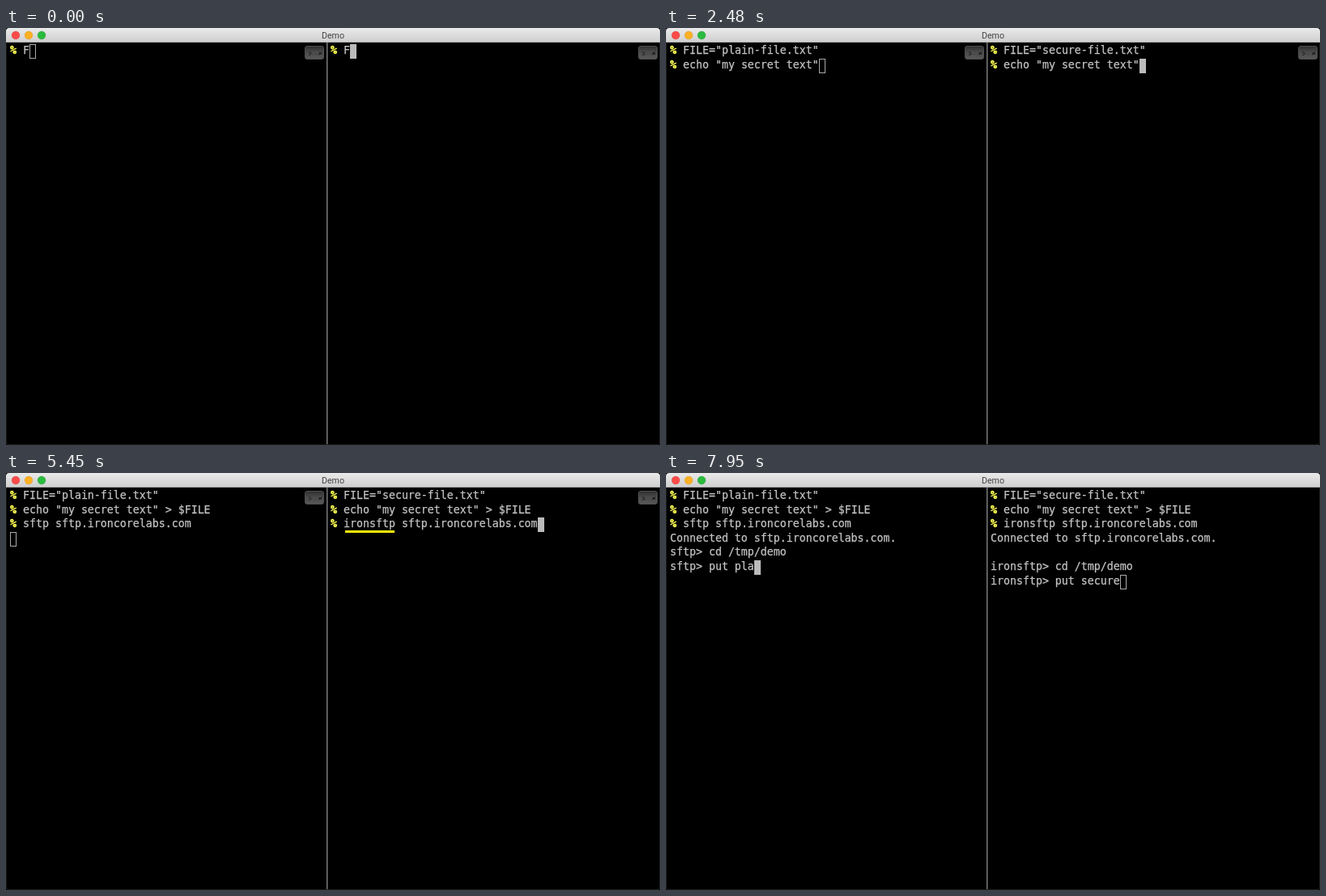
Write an HTML page that moves like this. It is 808 px wide and 516 px high and loops after 8000 ms.

```html
<!DOCTYPE html>
<html lang="en">
<head>
<meta charset="utf-8">
<title>Demo</title>
<style>
  html, body { margin: 0; width: 100%; height: 100%; overflow: hidden; background: #000; }
  svg { display: block; width: 808px; height: 516px; }
  text { white-space: pre; }
  .term { font: 13.288px "DejaVu Sans Mono", monospace; fill: #c4c4c4; stroke: #c4c4c4; stroke-width: .25; }
  .prompt { font-weight: bold; fill: #ffff55; stroke: #ffff55; stroke-width: .5; }
  .title { font: 10.7px Roboto, sans-serif; fill: #444; text-anchor: middle; }
</style>
</head>
<body>
<svg id="stage" viewBox="0 0 808 516">
  <defs>
    <linearGradient id="bar" x2="0" y2="1">
      <stop offset="0" stop-color="#eaeaea"/>
      <stop offset="1" stop-color="#cecece"/>
    </linearGradient>
    <linearGradient id="metal" x2="0" y2="1">
      <stop offset="0" stop-color="#2e2e2e"/>
      <stop offset=".45" stop-color="#4a4a4a"/>
      <stop offset="1" stop-color="#585858"/>
    </linearGradient>
    <g id="icon">
      <rect x=".5" y=".5" width="23" height="16" rx="2.5" fill="url(#metal)" stroke="#4e4e4e"/>
      <path d="M5 8H6.2A1.6 1.6 0 0 1 6.2 11.2H5" fill="none" stroke="#181818"/>
      <path d="M9 10.5H16" stroke="#404040" stroke-dasharray="1 1"/>
      <path d="M17.5 11.5L21 7.5M18 8L21 11M17.5 9.5H21" stroke="#181818"/>
    </g>
  </defs>
  <rect width="808" height="516"/>
  <path d="M0 18V4Q0 0 4 0H804Q808 0 808 4V18Z" fill="url(#bar)"/>
  <path d="M0 17.5H808" stroke="#a9a9a9"/>
  <circle cx="12" cy="9" r="4.8" fill="#fc4b48" stroke="#dc3b38" stroke-width=".6"/>
  <circle cx="28" cy="9" r="4.8" fill="#fdb023" stroke="#dc981c" stroke-width=".6"/>
  <circle cx="44" cy="9" r="4.8" fill="#29bb3d" stroke="#1c9e2e" stroke-width=".6"/>
  <text class="title" x="404" y="13">Demo</text>
  <path d="M.25 18V512Q.25 515.7 4 515.7H804Q807.7 515.7 807.7 512V18" fill="none" stroke="#454545" stroke-width=".5"/>
  <path d="M396.75 18V515" stroke="#8c8c8c" stroke-width="1.3"/>
  <g id="icons"><use href="#icon" x="369" y="22"/><use href="#icon" x="781" y="22"/></g>
  <rect id="mark" x="419" y="71" width="61" height="3" fill="#fbee0a"/>
</svg>
<script>
const LOOP = 8000, CELL = 8, PITCH = 17.6, ROWS = 7;
const LEFT = [0], RIGHT = [1], BOTH = [0, 1];
const stage = document.getElementById('stage');
const icons = document.getElementById('icons');
const mark = document.getElementById('mark');

function add(tag, attrs) {
  const el = document.createElementNS('http://www.w3.org/2000/svg', tag);
  set(el, attrs);
  return stage.appendChild(el);
}
function set(el, attrs) {
  for (const k in attrs) el.setAttribute(k, attrs[k]);
}
const rowTop = n => Math.round(20 + PITCH * n);

// Output events: when, which panes, what is appended
const events = [];
function print(time, panes, text) {
  events.push({ time, panes, text });
}
function type(from, to, panes, text, steps = text.length) {
  const cut = i => Math.round(i * text.length / steps);
  for (let i = 0; i < steps; i++) {
    const time = steps > 1 ? from + (to - from) * i / (steps - 1) : from;
    print(time, panes, text.slice(cut(i), cut(i + 1)));
  }
}

print(0, BOTH, '% F');
type(60, 90, BOTH, 'ILE', 2);
print(420, BOTH, '=');
print(600, BOTH, '"');
type(630, 660, RIGHT, 'secure', 2);
type(690, 750, LEFT, 'plain', 2);
type(930, 1170, BOTH, '-file.txt', 7);
print(1320, BOTH, '"\n% ');
type(1520, 1880, BOTH, 'echo "my');
type(1910, 2300, BOTH, ' secret ', 6);
print(2300, LEFT, 't');
print(2330, RIGHT, 't');
type(2330, 2750, BOTH, 'ext" > $FIL', 9);
print(3480, BOTH, 'E\n% ');
type(4190, 4250, RIGHT, 'ironsftp', 3);
type(4280, 4310, LEFT, 'sftp', 2);
type(4340, 4400, BOTH, ' sft', 3);
type(4460, 4970, BOTH, 'p.ironcorel');
type(5000, 5240, BOTH, 'abs.com');
print(5450, LEFT, '\n');
print(5580, LEFT, 'Connected to sftp.ironcorelabs.com.\nsftp> ');
print(5580, RIGHT, '\nConnected to sftp.ironcorelabs.com.\n\nironsftp> ');
type(5820, 6300, BOTH, 'cd /tmp/demo');
print(7050, LEFT, '\nsftp> ');
print(7050, RIGHT, '\nironsftp> ');
type(7380, 7522, BOTH, 'put ');
type(7570, 7807, RIGHT, 'secure');
type(7855, 7950, LEFT, 'pla');
events.sort((a, b) => a.time - b.time);

// The icons show only while both panes share the input
const leftFocus = [[690, 780], [4280, 4340], [7830, LOOP]];
const iconsOff = [[630, 780], [4190, 4340], [7570, LOOP]];
const marked = [[4310, 5580]];
const within = (spans, t) => spans.some(([a, b]) => t >= a && t < b);
const show = (el, on) => set(el, { visibility: on ? 'visible' : 'hidden' });

const panes = [5, 401].map(x => ({
  x,
  rows: Array.from({ length: ROWS }, (_, n) => {
    const y = rowTop(n) + 12;
    return {
      prompt: add('text', { class: 'term prompt', x, y }),
      body: add('text', { class: 'term', y })
    };
  }),
  cursor: add('rect', {})
}));

function put(el, text) {
  if (el.textContent !== text) el.textContent = text;
}

function drawPane(pane, text, focused) {
  const lines = text.split('\n');
  pane.rows.forEach((row, n) => {
    const line = lines[n] || '';
    const skip = line.startsWith('% ') ? 2 : 0;
    put(row.prompt, skip ? '%' : '');
    set(row.body, { x: pane.x + skip * CELL });
    put(row.body, line.slice(skip));
  });
  const last = lines.length - 1;
  const x = pane.x + lines[last].length * CELL, y = rowTop(last);
  set(pane.cursor, focused
    ? { x, y, width: 8, height: 18, fill: '#bbb', stroke: 'none' }
    : { x: x + .5, y: y + .5, width: 7, height: 17, fill: 'none', stroke: '#aaa' });
}

function draw(t) {
  const text = ['', ''];
  for (const e of events) {
    if (e.time > t) break;
    for (const p of e.panes) text[p] += e.text;
  }
  const left = within(leftFocus, t);
  drawPane(panes[0], text[0], left);
  drawPane(panes[1], text[1], !left);
  show(icons, !within(iconsOff, t));
  show(mark, within(marked, t));
}

const start = performance.now();
function tick() {
  draw((performance.now() - start) % LOOP);
  requestAnimationFrame(tick);
}
tick();
</script>
</body>
</html>
```
